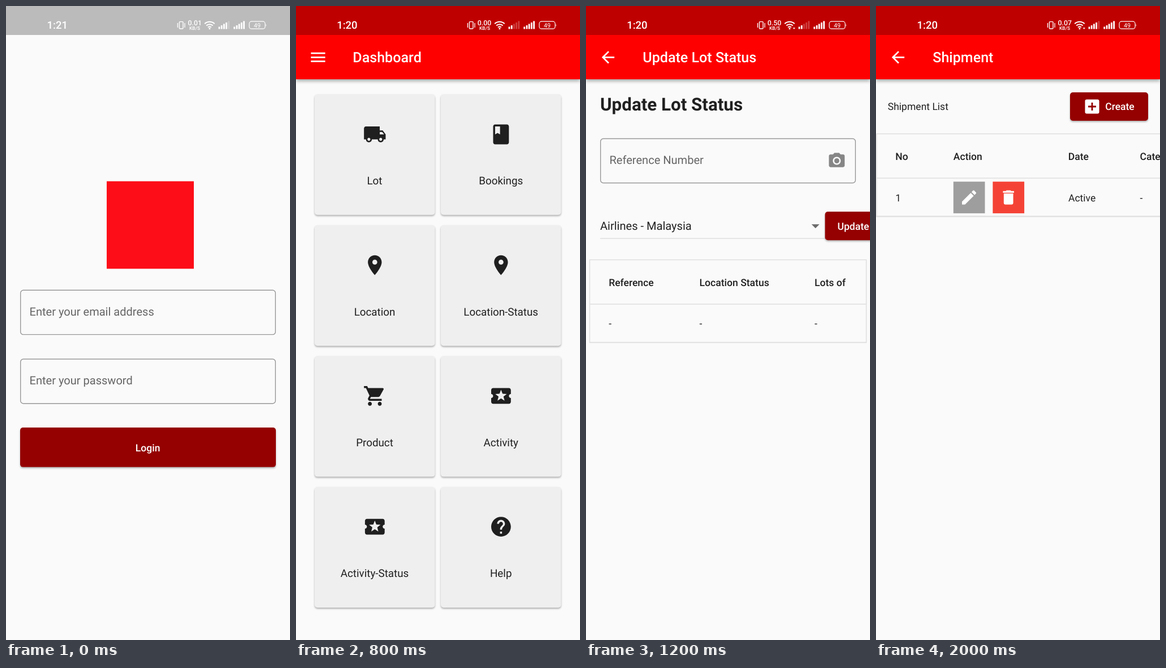
Write an HTML page that moves like this. It is 502 px wide and 1116 px high and loops after 2400 ms.

```html
<!DOCTYPE html>
<html lang="en">
<head>
<meta charset="utf-8">
<title>Delivery app tour</title>
<style>
  html, body { margin: 0; width: 100%; height: 100%; overflow: hidden; background: #fafafa; }
  svg { display: block; width: 100%; height: 100%; }
  text { font: 400 17.55px Roboto, sans-serif; fill: #202020; text-rendering: geometricPrecision; white-space: pre; }
  .screen { opacity: 0; animation: show 2400ms step-end infinite; animation-delay: calc(var(--i) * 400ms - 2400ms); }
  @keyframes show {
    0% { opacity: 1; }
    16.6667%, 100% { opacity: 0; }
  }
  .mid { text-anchor: middle; }
  .med { font-weight: 500; }
  .title { font-size: 25.07px; font-weight: 500; fill: #fff; }
  .head { font-size: 31.34px; font-weight: 700; }
  .label { font-size: 18.81px; text-anchor: middle; }
  .hint { font-size: 20.06px; fill: #656565; }
  .input { font-size: 20.06px; }
  .white { fill: #fff; }
  .clock { font-size: 18.5px; font-weight: 500; fill: #fff; }
  .rate { font-size: 12.3px; font-weight: 500; fill: #fff; text-anchor: middle; }
  .unit { font-size: 8.5px; font-weight: 500; fill: #fff; text-anchor: middle; }
  .level { font-size: 10.8px; fill: #fff; text-anchor: middle; }
  .field { fill: none; stroke: #979797; stroke-width: 1.4; }
  .line { fill: none; stroke: #dfdfdf; stroke-width: 1.5; }
  .raised { filter: drop-shadow(0 2px 1.5px rgba(0, 0, 0, .3)); }
  .bar { filter: drop-shadow(0 3px 3px rgba(0, 0, 0, .35)); }
  .drawer { filter: drop-shadow(2px 0 4px rgba(0, 0, 0, .2)); }
  .dark { fill: #1f1f1f; }
  .soft { filter: blur(.6px); }
  .soft text { font-size: 11px; fill: #5d6063; }
  .haze { filter: blur(18px); }
</style>
</head>
<body>
<svg viewBox="0 0 502 1116">
  <defs>
    <g id="truck"><path transform="translate(-12 -12)" d="M20 8h-3V4H3c-1.1 0-2 .9-2 2v11h2c0 1.66 1.34 3 3 3s3-1.34 3-3h6c0 1.66 1.34 3 3 3s3-1.34 3-3h2v-5l-3-4zM6 18.5c-.83 0-1.5-.67-1.5-1.5s.67-1.5 1.5-1.5 1.5.67 1.5 1.5-.67 1.5-1.5 1.5zm13.5-9l1.96 2.5H17V9.5h2.5zm-1.5 9c-.83 0-1.5-.67-1.5-1.5s.67-1.5 1.5-1.5 1.5.67 1.5 1.5-.67 1.5-1.5 1.5z"/></g>
    <g id="book"><path transform="translate(-12 -12)" d="M18 2H6c-1.1 0-2 .9-2 2v16c0 1.1.9 2 2 2h12c1.1 0 2-.9 2-2V4c0-1.1-.9-2-2-2zM6 4h5v8l-2.5-1.5L6 12V4z"/></g>
    <g id="pin"><path transform="translate(-12 -12)" d="M12 2C8.13 2 5 5.13 5 9c0 5.25 7 13 7 13s7-7.75 7-13c0-3.87-3.13-7-7-7zm0 9.5c-1.38 0-2.5-1.12-2.5-2.5s1.12-2.5 2.5-2.5 2.5 1.12 2.5 2.5-1.12 2.5-2.5 2.5z"/></g>
    <g id="cart"><path transform="translate(-12 -12)" d="M7 18c-1.1 0-1.99.9-1.99 2S5.9 22 7 22s2-.9 2-2-.9-2-2-2zM1 2v2h2l3.6 7.59-1.35 2.45c-.16.28-.25.61-.25.96 0 1.1.9 2 2 2h12v-2H7.42c-.14 0-.25-.11-.25-.25l.03-.12.9-1.63h7.45c.75 0 1.41-.41 1.75-1.03l3.58-6.49c.08-.14.12-.31.12-.48 0-.55-.45-1-1-1H5.21l-.94-2H1zm16 16c-1.1 0-1.99.9-1.99 2s.89 2 1.99 2 2-.9 2-2-.9-2-2-2z"/></g>
    <g id="ticket"><path transform="translate(-12 -12)" d="M20 12c0-1.1.9-2 2-2V6c0-1.1-.9-2-2-2H4c-1.1 0-1.99.9-1.99 2v4c1.1 0 1.99.9 1.99 2s-.89 2-2 2v4c0 1.1.9 2 2 2h16c1.1 0 2-.9 2-2v-4c-1.1 0-2-.9-2-2zm-4.42 4.8L12 14.5l-3.58 2.3 1.08-4.12-3.29-2.69 4.24-.25L12 5.8l1.54 3.95 4.24.25-3.29 2.69 1.09 4.11z"/></g>
    <g id="help"><path transform="translate(-12 -12)" d="M12 2C6.48 2 2 6.48 2 12s4.48 10 10 10 10-4.48 10-10S17.52 2 12 2zm1 17h-2v-2h2v2zm2.07-7.75l-.9.92C13.45 12.9 13 13.5 13 15h-2v-.5c0-1.1.45-2.1 1.17-2.83l1.24-1.26c.37-.36.59-.86.59-1.41 0-1.1-.9-2-2-2s-2 .9-2 2H8c0-2.21 1.79-4 4-4s4 1.79 4 4c0 .88-.36 1.68-.93 2.25z"/></g>
    <g id="person"><path transform="translate(-12 -12)" d="M12 12c2.21 0 4-1.79 4-4s-1.79-4-4-4-4 1.79-4 4 1.79 4 4 4zm0 2c-2.67 0-8 1.34-8 4v2h16v-2c0-2.66-5.33-4-8-4z"/></g>
    <g id="exit"><path transform="translate(-12 -12)" d="M17 7l-1.41 1.41L18.17 11H8v2h10.17l-2.58 2.58L17 17l5-5zM4 5h8V3H4c-1.1 0-2 .9-2 2v14c0 1.1.9 2 2 2h8v-2H4V5z"/></g>
    <g id="chart"><path transform="translate(-12 -12)" d="M6 10h3v10H6zM6 5h3v4H6zM16 16h3v4h-3zM16 13h3v2h-3zM11 13h3v7h-3zM11 9h3v3h-3z"/></g>
    <g id="camera"><path transform="translate(-12 -12)" d="M9 2L7.17 4H4c-1.1 0-2 .9-2 2v12c0 1.1.9 2 2 2h16c1.1 0 2-.9 2-2V6c0-1.1-.9-2-2-2h-3.17L15 2H9zm3 15c-2.76 0-5-2.24-5-5s2.24-5 5-5 5 2.24 5 5-2.24 5-5 5z"/><circle r="3.2"/></g>
    <g id="add"><path transform="translate(-12 -12)" d="M19 3H5c-1.11 0-2 .9-2 2v14c0 1.1.89 2 2 2h14c1.1 0 2-.9 2-2V5c0-1.1-.9-2-2-2zm-2 10h-4v4h-2v-4H7v-2h4V7h2v4h4v2z"/></g>
    <g id="edit"><path transform="translate(-12 -12)" d="M3 17.25V21h3.75L17.81 9.94l-3.75-3.75L3 17.25zM20.71 7.04c.39-.39.39-1.02 0-1.41l-2.34-2.34c-.39-.39-1.02-.39-1.41 0l-1.83 1.83 3.75 3.75 1.83-1.83z"/></g>
    <g id="bin"><path transform="translate(-12 -12)" d="M6 19c0 1.1.9 2 2 2h8c1.1 0 2-.9 2-2V7H6v12zM19 4h-3.5l-1-1h-5l-1 1H5v2h14V4z"/></g>
    <g id="back" fill="#fff" transform="translate(39 90.3) scale(1.393)"><path transform="translate(-12 -12)" d="M20 11H7.83l5.59-5.59L12 4l-8 8 8 8 1.41-1.41L7.83 13H20v-2z"/></g>

    <!-- status bar -->
    <g id="status" fill="#fff">
      <g fill="none" stroke="#fff" stroke-width="1.4">
        <rect x="306.4" y="27.6" width="6.6" height="12.4" rx="1.2"/>
        <path d="M303.4 30v8M316 30v8" stroke-width="1.3"/>
        <rect x="430" y="27.2" width="28" height="13" rx="4" stroke-width="1.2"/>
      </g>
      <path d="M459.4 31.5q1.6 2.2 0 4.4z"/>
      <text class="level" x="444" y="37.7">49</text>
      <text class="unit" x="333.6" y="42">KB/S</text>
      <g fill="none" stroke="#fff" stroke-width="2">
        <path d="M351.2 31.2a12.6 12.6 0 0 1 17.4 0M354.2 34.6a8.3 8.3 0 0 1 11.4 0M357 37.6a4.3 4.3 0 0 1 5.8 0"/>
      </g>
      <circle cx="359.9" cy="39.8" r="1.5"/>
      <path d="M402.3 36.5h2.8v4h-2.8zM406.6 34h2.8v6.5h-2.8zM410.8 31.5h2.8v9h-2.8zM415 29h2.8v11.5h-2.8zM419.2 26.5h2.8v14h-2.8z"/>
      <path d="M375.6 36.5h2.8v4h-2.8zM379.8 34h2.8v6.5h-2.8z"/>
      <path d="M384 31.5h2.8v9H384zM388.2 29h2.8v11.5h-2.8zM392.4 26.5h2.8v14h-2.8z" opacity=".25"/>
    </g>
    <path id="strong" fill="#fff" d="M384 31.5h2.8v9H384zM388.2 29h2.8v11.5h-2.8z"/>
    <path id="down" fill="#fff" d="M365.8 38.3h4l-2 2.6z"/>

    <g id="appbar">
      <rect class="bar" width="502" height="129" fill="#f00"/>
      <rect width="502" height="51" fill="#bf0000"/>
    </g>

    <!-- dashboard -->
    <rect id="card" class="raised" width="212.5" height="212.5" rx="5" fill="#efefef"/>
    <g id="row">
      <use href="#card" x="33" y="155.3"/>
      <use href="#card" x="256" y="155.3"/>
    </g>
    <g id="dash">
      <rect width="502" height="1116" fill="#fafafa"/>
      <use href="#appbar"/>
      <path fill="#fff" d="M26.4 81.8h25.2v2.8H26.4zM26.4 88.9h25.2v2.8H26.4zM26.4 96h25.2v2.8H26.4z"/>
      <text class="title" x="100.3" y="99.4">Dashboard</text>
      <use href="#row"/>
      <use href="#row" y="230.4"/>
      <use href="#row" y="460.8"/>
      <use href="#row" y="691.2"/>
      <g class="dark">
        <use href="#truck" transform="translate(139.3 226) scale(1.741)"/>
        <use href="#book" transform="translate(362.4 226) scale(1.741)"/>
        <use href="#pin" transform="translate(139.3 456.2) scale(1.741)"/>
        <use href="#pin" transform="translate(362.4 456.2) scale(1.741)"/>
        <use href="#cart" transform="translate(139.3 686.4) scale(1.741)"/>
        <use href="#ticket" transform="translate(362.4 686.4) scale(1.741)"/>
        <use href="#ticket" transform="translate(139.3 916.6) scale(1.741)"/>
        <use href="#help" transform="translate(362.4 916.6) scale(1.741)"/>
      </g>
      <text class="label" x="139" y="314.4">Lot</text>
      <text class="label" x="362.2" y="314.4">Bookings</text>
      <text class="label" x="139" y="544.6">Location</text>
      <text class="label" x="362.2" y="544.6">Location-Status</text>
      <text class="label" x="139" y="774.8">Product</text>
      <text class="label" x="362.2" y="774.8">Activity</text>
      <text class="label" x="139" y="1005">Activity-Status</text>
      <text class="label" x="362.2" y="1005">Help</text>
    </g>

    <linearGradient id="wall" x2="1" y2="0">
      <stop stop-color="#55524d"/>
      <stop offset=".3" stop-color="#858078"/>
      <stop offset="1" stop-color="#77746e"/>
    </linearGradient>
    <clipPath id="view"><rect y="129" width="502" height="822"/></clipPath>
    <clipPath id="window"><rect x="49" y="338" width="404" height="404"/></clipPath>
    <path id="corner" fill="none" stroke="#c43b31" stroke-width="7" d="M45.5 387V345.5q0-11 11-11H98"/>
  </defs>

  <!-- login -->
  <g class="screen" style="--i:0">
    <rect width="502" height="1116" fill="#fafafa"/>
    <rect width="502" height="51" fill="#bbb"/>
    <text class="clock" x="72.6" y="40.3">1:21</text>
    <use href="#status"/>
    <use href="#strong"/>
    <text class="rate" x="333.8" y="34.3">0.01</text>
    <rect x="178" y="308.5" width="154" height="154" fill="#fd0d18"/>
    <rect class="field" x="25.7" y="500.2" width="450.6" height="78.2" rx="5"/>
    <text class="hint" x="41.5" y="545">Enter your email address</text>
    <rect class="field" x="25.7" y="621.5" width="450.6" height="78.2" rx="5"/>
    <text class="hint" x="41.5" y="666.4">Enter your password</text>
    <rect class="raised" x="25" y="742" width="452" height="69.6" rx="5" fill="#950000"/>
    <text class="med mid white" x="250.6" y="783.5">Login</text>
  </g>

  <!-- drawer -->
  <g class="screen" style="--i:1">
    <use href="#dash"/>
    <rect width="502" height="1116" opacity=".54"/>
    <rect class="drawer" width="424" height="1116" fill="#fafafa"/>
    <rect width="424" height="275.5" fill="#e0e0e0"/>
    <rect width="424" height="51" fill="#a8a8a8"/>
    <text class="clock" x="72.2" y="40.3">1:20</text>
    <use href="#status"/>
    <text class="rate" x="333" y="34.3">1.00</text>
    <rect x="130" y="79" width="176" height="176" fill="#fd0d18"/>
    <use href="#chart" transform="translate(39 326.6) scale(1.393)"/>
    <use href="#truck" transform="translate(39 404.6) scale(1.393)"/>
    <use href="#person" transform="translate(39 482.6) scale(1.393)"/>
    <use href="#exit" transform="translate(39 560.6) scale(1.393)"/>
    <text class="med" x="100.3" y="332.6">Update lot status</text>
    <text class="med" x="100.3" y="410.7">Shipments</text>
    <text class="med" x="100.3" y="488.7">Profile</text>
    <text class="med" x="100.3" y="566.8">Sign out</text>
  </g>

  <!-- dashboard -->
  <g class="screen" style="--i:2">
    <use href="#dash"/>
    <text class="clock" x="72.2" y="40.3">1:20</text>
    <use href="#status"/>
    <text class="rate" x="333" y="34.3">0.00</text>
  </g>

  <!-- lot status -->
  <g class="screen" style="--i:3">
    <rect width="502" height="1116" fill="#fafafa"/>
    <use href="#appbar"/>
    <use href="#back"/>
    <text class="title" x="100.3" y="99.4">Update Lot Status</text>
    <text class="clock" x="72.2" y="40.3">1:20</text>
    <use href="#status"/>
    <use href="#down"/>
    <text class="rate" x="333" y="34.3">0.50</text>
    <text class="head" x="25" y="184">Update Lot Status</text>
    <rect class="field" x="25.7" y="233.5" width="450.6" height="78" rx="5"/>
    <text class="hint" x="41.5" y="278.3">Reference Number</text>
    <use href="#camera" fill="#868686" transform="translate(443.3 272.5) scale(1.393)"/>
    <text class="input" x="25" y="394">Airlines - Malaysia</text>
    <path fill="#6b6b6b" d="M398.6 384.2h14l-7 7z"/>
    <path class="line" stroke-width="1" d="M25 409.3h398"/>
    <rect class="raised" x="422.5" y="362" width="100" height="50.2" rx="5" fill="#950000"/>
    <text class="med white" x="444.5" y="393.8">Update</text>
    <rect class="line" x="6.5" y="446.7" width="489" height="145.5"/>
    <path class="line" d="M6 524.7h490M6 592.6h490"/>
    <text class="med" x="40.2" y="493">Reference</text>
    <text class="med" x="200.6" y="493">Location Status</text>
    <text class="med" x="404" y="493">Lots of</text>
    <text x="40.2" y="565">-</text>
    <text x="200.6" y="565">-</text>
    <text x="404" y="565">-</text>
  </g>

  <!-- scanner -->
  <g class="screen" style="--i:4">
    <rect width="502" height="1116" fill="#fafafa"/>
    <g clip-path="url(#view)">
      <rect y="129" width="502" height="822" fill="#0b0b0c"/>
      <path fill="url(#wall)" d="M0 129h502v30L0 152z"/>
      <path fill="#2b2927" d="M0 140q12 2 14 8l-14 4z"/>
      <path fill="#141617" d="M0 203l502 6v30L0 234z"/>
      <path fill="#1c1e20" d="M0 236l502 5v27L0 262z"/>
      <g class="soft" transform="rotate(.65 0 222)">
        <g fill="#3c5347">
          <path d="M77 215h9v6h-9zM143 214h9v6h-9zM208 213h9v6h-9zM273 213h9v6h-9zM337 213h9v6h-9z"/>
        </g>
        <g fill="#686a6c">
          <circle cx="18" cy="219" r="5"/>
          <circle cx="405" cy="218" r="6.5"/>
          <circle cx="467" cy="218" r="5.5"/>
        </g>
        <text x="30" y="222">Modul</text>
        <text x="95" y="222">More N</text>
        <text x="160" y="222">Binary</text>
        <text x="225" y="222">More N</text>
        <text x="290" y="222">Happy</text>
        <text x="354" y="222">Find t</text>
        <text x="417" y="222">tovel</text>
        <text x="480" y="222">Cale</text>
        <text x="-2" y="252" style="fill:#4a4d50">012345678901&amp;message_id=mid.%24aBBBCCdEfgh-JkLmNo1PQrstUvw-8x&amp;thread_id=1234567890123</text>
      </g>
      <rect x="49" y="338" width="404" height="404" fill="#1e1e1f"/>
      <g clip-path="url(#window)">
        <g class="haze" fill="#414142">
          <ellipse cx="150" cy="352" rx="130" ry="18"/>
          <ellipse cx="440" cy="570" rx="22" ry="90"/>
        </g>
      </g>
      <path fill="#d5d3df" stroke="#8e8d96" d="M65 376.5l345.7 2.5-4 342H65z"/>
      <use href="#corner"/>
      <use href="#corner" transform="translate(502 0) scale(-1 1)"/>
      <use href="#corner" transform="translate(0 1080.5) scale(1 -1)"/>
      <use href="#corner" transform="translate(502 1080.5) scale(-1 -1)"/>
      <g class="soft">
        <path fill="#2a2a2c" d="M144 836h30v30h-30zM298 835h29v31h-29z"/>
        <path fill="#59595b" d="M182 836h31v30h-31zM283 840h6v22h-6z"/>
        <rect x="155" y="879" width="20" height="20" fill="#1f618f"/>
        <path fill="#8d7540" d="M191 880h8l2 3h10v15h-20z"/>
        <rect x="227" y="879" width="20" height="20" fill="#205a91"/>
        <circle cx="271.5" cy="888.5" r="10" fill="#8b6f45"/>
        <circle cx="307" cy="888" r="10" fill="#41477d"/>
        <path stroke="#6d6d6d" stroke-width="2" d="M198 902.5h5M234 902.5h5M265 902.5h12M304 902.5h5"/>
      </g>
    </g>
    <use href="#appbar"/>
    <use href="#back"/>
    <text class="title" x="100.3" y="99.4">Scan QR Code</text>
    <text class="clock" x="72.2" y="40.3">1:20</text>
    <use href="#status"/>
    <use href="#strong"/>
    <use href="#down"/>
    <text class="rate" x="333" y="34.3">1.00</text>
    <text x="39" y="982">Ref:AWBO1070010,R. Name:tavin, R.</text>
    <text x="39" y="1003">City:Gazipur,Gross Weight:5.0</text>
    <rect class="raised" x="206.3" y="1043.7" width="89.4" height="50" rx="5" fill="#f00"/>
    <text class="med mid white" x="250.5" y="1075.2">Done</text>
  </g>

  <!-- shipments -->
  <g class="screen" style="--i:5">
    <rect width="502" height="1116" fill="#fafafa"/>
    <use href="#appbar"/>
    <use href="#back"/>
    <text class="title" x="100.3" y="99.4">Shipment</text>
    <text class="clock" x="72.6" y="40.3">1:20</text>
    <use href="#status"/>
    <use href="#strong"/>
    <use href="#down"/>
    <text class="rate" x="333.8" y="34.3">0.07</text>
    <text x="20.8" y="183">Shipment List</text>
    <rect class="raised" x="343" y="152" width="138" height="50" rx="5" fill="#950000"/>
    <use href="#add" fill="#fff" transform="translate(382 177) scale(1.393)"/>
    <text class="med white" x="405.2" y="183">Create</text>
    <rect class="line" x="1" y="225" width="520" height="145"/>
    <path class="line" d="M0 303h502M0 370.8h502"/>
    <text class="med" x="34.2" y="271.4">No</text>
    <text class="med" x="136.8" y="271.4">Action</text>
    <text class="med" x="339.8" y="271.4">Date</text>
    <text class="med" x="466.6" y="271.4">Category</text>
    <text x="34.2" y="343.8">1</text>
    <rect x="136.8" y="309.2" width="55.7" height="55.7" fill="#9e9e9e"/>
    <rect x="206.4" y="309.2" width="55.7" height="55.7" fill="#f44336"/>
    <use href="#edit" fill="#fff" transform="translate(164.6 337) scale(1.393)"/>
    <use href="#bin" fill="#fff" transform="translate(234.2 337) scale(1.393)"/>
    <text x="340" y="343.8">Active</text>
    <text x="466.6" y="343.8">-</text>
  </g>
</svg>
</body>
</html>
```
